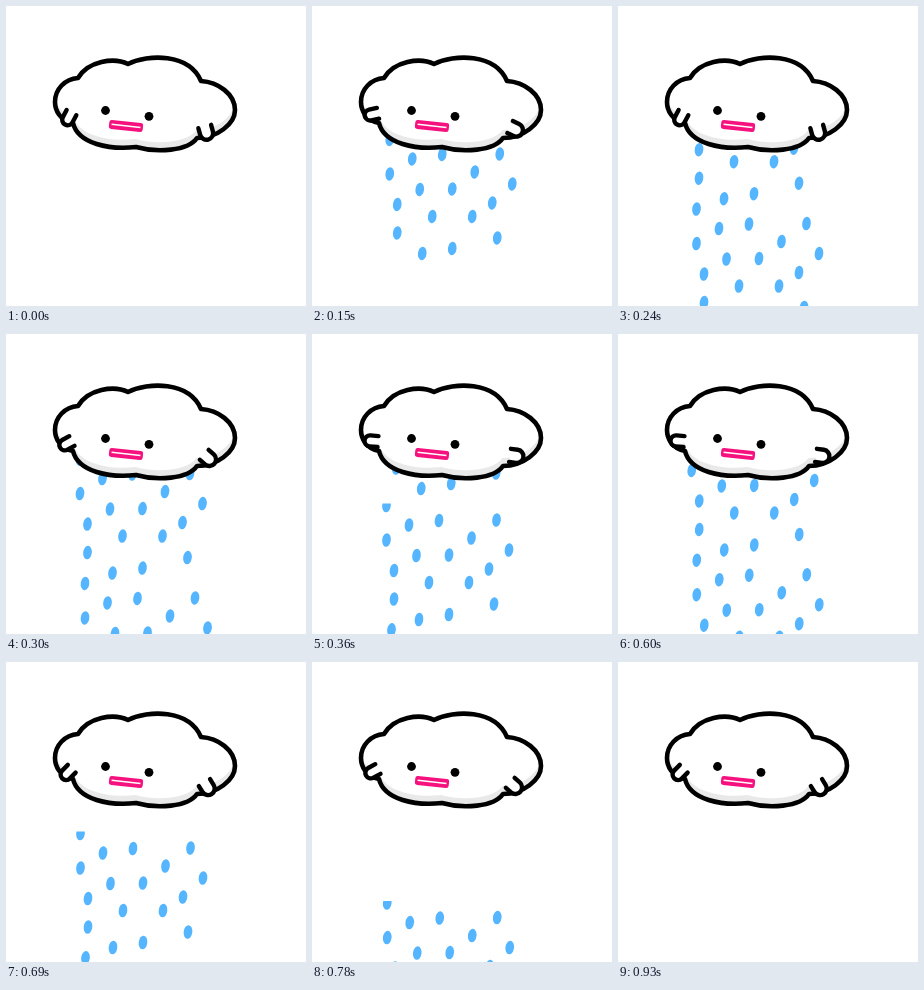
Recreate the animation shown at these times as an HTML page with a canvas. Size 300 px wide and 300 px high, loop 960 ms.

```html
<!DOCTYPE html>
<html lang="en">
<head>
<meta charset="utf-8">
<title>Rain cloud</title>
<style>
  html, body { margin: 0; width: 100%; height: 100%; overflow: hidden; background: #fff; }
  canvas { display: block; }
</style>
</head>
<body>
<canvas id="stage" width="300" height="300"></canvas>
<script>
const ctx = document.getElementById('stage').getContext('2d');
const STEP = 30, STEPS = 32;
const FALL = 23.2, DRIFT = 0.25;

// One shower of drops: x on the stage, y below the top of the shower.
const drops = [
  [74.5, 2], [184.5, 16.5], [127, 17], [97, 21.5], [74.5, 36.5], [159.5, 34.5],
  [197, 46.5], [137, 51.5], [104.5, 52], [82, 67], [177, 65.5], [117, 79],
  [157, 79], [82, 95.5], [182, 100.5], [137, 111], [107, 116]
];

// Two kinds of shower, each repeated after 11 steps.
const showers = [
  { x: 2, y: 15.4, delay: 0, cut: false },
  { x: -3, y: -108.9, delay: 0, cut: true },
  { x: 2, y: 15.4, delay: 11, cut: false },
  { x: -3, y: -108.9, delay: 11, cut: true }
];

const cloud = new Path2D(
  'M122 58 C142 48 183 47 195 75 C212 76 229 88 229 104 C229 118 211 132 191 132 ' +
  'C182 145 151 147 130 141 C104 144 72 138 67 117 C54 115 49 104 49 96 ' +
  'C49 83 59 73 72 72 C82 55 108 51 122 58 Z');

function drawShower({ x, y, delay, cut }, step) {
  const age = step - delay;
  const top = y + FALL * age;
  const left = x + DRIFT * age;
  const edge = cut ? Math.max(100, top) : 100;
  ctx.save();
  ctx.beginPath();
  ctx.rect(0, edge, 300, 300);
  ctx.clip();
  ctx.fillStyle = '#55b5ff';
  for (const [dx, dy] of drops) {
    ctx.beginPath();
    ctx.ellipse(left + dx, top + dy, 4.3, 6.8, 0.12, 0, 2 * Math.PI);
    ctx.fill();
  }
  ctx.restore();
}

function drawCloud() {
  ctx.lineJoin = 'round';
  ctx.lineWidth = 4.6;
  ctx.strokeStyle = '#000';
  ctx.save();
  ctx.clip(cloud);
  ctx.fillStyle = '#e9e9e9';
  ctx.fill(cloud);
  ctx.translate(-0.5, -8);
  ctx.fillStyle = '#fff';
  ctx.fill(cloud);
  ctx.fillRect(40, 40, 200, 58);
  ctx.restore();
  ctx.stroke(cloud);
}

function drawFace() {
  ctx.fillStyle = '#000';
  for (const [x, y] of [[99.5, 104.5], [143, 110.3]]) {
    ctx.beginPath();
    ctx.arc(x, y, 4.4, 0, 2 * Math.PI);
    ctx.fill();
  }
  ctx.save();
  ctx.translate(120, 120);
  ctx.rotate(0.11);
  ctx.fillStyle = '#f5127f';
  ctx.beginPath();
  ctx.roundRect(-17, -4.5, 34, 9, 2.5);
  ctx.fill();
  ctx.fillStyle = '#fff';
  ctx.fillRect(-14.5, -0.8, 29, 1.5);
  ctx.restore();
}

function drawHand(x, y, degrees, half) {
  ctx.save();
  ctx.translate(x, y);
  ctx.rotate(degrees * Math.PI / 180);
  ctx.beginPath();
  ctx.moveTo(-1, -half);
  ctx.lineTo(12.5 - half, -half);
  ctx.arc(12.5 - half, 0, half, -Math.PI / 2, Math.PI / 2);
  ctx.lineTo(-1, half);
  ctx.fillStyle = '#fff';
  ctx.fill();
  ctx.lineCap = 'round';
  ctx.lineWidth = 4.4;
  ctx.stroke();
  ctx.restore();
}

function draw(now) {
  const step = Math.floor(now / STEP) % STEPS;
  const swing = 1 - Math.abs(step % 8 - 4) / 4;
  ctx.fillStyle = '#fff';
  ctx.fillRect(0, 0, 300, 300);
  showers.forEach(shower => drawShower(shower, step));
  drawCloud();
  drawFace();
  drawHand(65, 107.5, 118 + 67 * swing, 5.5);
  drawHand(199, 121.5, 75 - 67 * swing, 6.6);
}

const start = performance.now();
function tick() {
  draw(performance.now() - start);
  requestAnimationFrame(tick);
}
tick();
</script>
</body>
</html>
```
